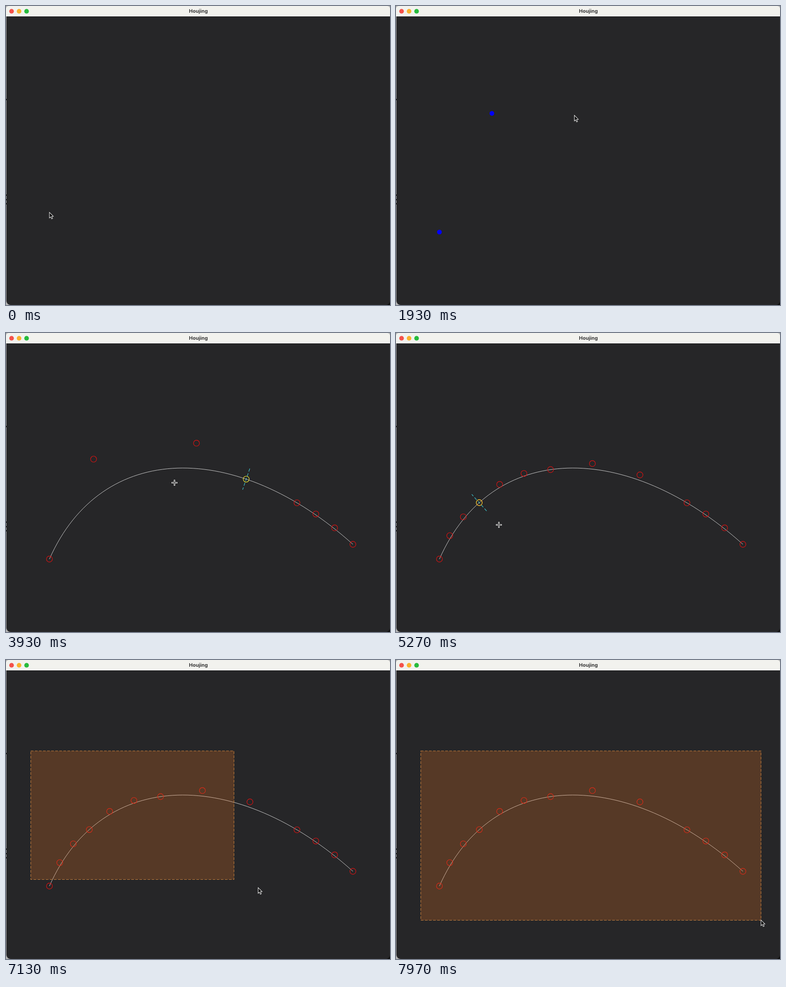
An HTML page with a canvas for the animation above (8 s loop, 849 by 660 pixels).

```html
<!DOCTYPE html>
<html lang="en">
<head>
<meta charset="utf-8">
<title>Houjing</title>
<style>
  html, body { margin: 0; width: 100%; height: 100%; overflow: hidden; background: #262628; }
  canvas { display: block; }
</style>
</head>
<body>
<canvas id="stage" width="849" height="660"></canvas>
<script>
const ctx = document.getElementById('stage').getContext('2d');
const LOOP = 8000;
const LAG = 60; // hover and selection trail the pointer

const control = [[96, 499], [212, 237], [511, 236.5], [767, 466.5]];
const dotTimes = [780, 1640, 2130];
const CURVE_AT = 2800;
const HOVER_FROM = 3100, HOVER_TO = 5800;
const DRAG_FROM = 6910;
const splits = [[3570, 0.842], [4330, 0.532], [5130, 0.44]];

// Eased pointer moves: start, end, x, y, sag
const home = [96, 455.5];
const moves = [
  [270, 300, 95.5, 454],
  [500, 690, 96, 498],
  [930, 1300, 148, 294],
  [1300, 1660, 212, 237],
  [1830, 2006, 511, 236.5, 5],
  [2270, 2630, 755, 448],
  [2670, 2790, 766, 466],
  [3100, 3560, 638, 385],
  [3800, 3962, 344, 325],
  [4450, 5000, 227, 423],
  [5600, 6030, 226, 420],
  [6200, 6600, 54.5, 201]
];
// Selection drag: time, x, y
const drag = [
  [6850, 54.5, 201], [6910, 110, 269], [6970, 364, 439], [7000, 440, 462],
  [7310, 718, 558], [7370, 754, 568], [7550, 804, 573], [7900, 807, 574]
];

const lerp = (a, b, k) => a + (b - a) * k;
const mix = (p, q, k) => [lerp(p[0], q[0], k), lerp(p[1], q[1], k)];
const ease = k => k * k * (3 - 2 * k);

function pointer(t) {
  const next = drag.findIndex(key => key[0] > t);
  if (next < 0) return drag[drag.length - 1].slice(1);
  if (next > 0) {
    const a = drag[next - 1], b = drag[next];
    return mix(a.slice(1), b.slice(1), (t - a[0]) / (b[0] - a[0]));
  }
  let pos = home;
  for (const [start, end, x, y, sag = 0] of moves) {
    if (t < start) break;
    const k = ease(Math.min(1, (t - start) / (end - start)));
    pos = mix(pos, [x, y], k);
    pos[1] += sag * Math.sin(Math.PI * k);
  }
  return pos;
}

// De Casteljau subdivision
function split([a, b, c, d], k) {
  const ab = mix(a, b, k), bc = mix(b, c, k), cd = mix(c, d, k);
  const l = mix(ab, bc, k), r = mix(bc, cd, k), m = mix(l, r, k);
  return { left: [a, ab, l, m], right: [m, r, cd, d], point: m, dir: [r[0] - l[0], r[1] - l[1]] };
}

function nearest(p) {
  let best = null, min = Infinity;
  for (let i = 0; i <= 600; i++) {
    const s = split(control, i / 600);
    const dist = Math.hypot(s.point[0] - p[0], s.point[1] - p[1]);
    if (dist < min) { min = dist; best = s; }
  }
  return best;
}

function handles(t) {
  let first = control, rest = [];
  for (const [at, k] of splits) {
    if (t < at) break;
    const s = split(first, k);
    rest = s.right.slice(1).concat(rest);
    first = s.left;
  }
  return first.concat(rest);
}

function circle([x, y], r, fill, stroke) {
  ctx.beginPath();
  ctx.arc(x, y, r, 0, Math.PI * 2);
  if (fill) { ctx.fillStyle = fill; ctx.fill(); }
  if (stroke) { ctx.strokeStyle = stroke; ctx.lineWidth = 1.15; ctx.stroke(); }
}

function line(a, b, color, width) {
  ctx.beginPath();
  ctx.moveTo(...a);
  ctx.lineTo(...b);
  ctx.strokeStyle = color;
  ctx.lineWidth = width;
  ctx.stroke();
}

function drawWindow() {
  ctx.fillStyle = '#b4b4b4';
  ctx.fillRect(0, 0, 849, 660);
  ctx.fillStyle = '#0c0c0c';
  ctx.fillRect(840, 650, 9, 10);
  for (const y of [205, 416, 426, 435]) ctx.fillRect(0, y, 1, 3);
  ctx.fillStyle = '#262628';
  ctx.beginPath();
  ctx.roundRect(1, 0, 848, 660, 9);
  ctx.fill();
  ctx.fillStyle = '#f2f2ee';
  ctx.beginPath();
  ctx.roundRect(0, 0, 849, 23, [6, 6, 0, 0]);
  ctx.fill();
  ctx.fillStyle = '#18181a';
  ctx.fillRect(1, 23, 848, 1);
  ['#f4524b', '#f9b32d', '#27bb3c'].forEach((color, i) => circle([12.3 + i * 16.6, 11.7], 5.1, color));
  ctx.fillStyle = '#383838';
  ctx.font = '700 11px Inter, sans-serif';
  ctx.textAlign = 'center';
  ctx.fillText('Houjing', 425.3, 15.3);
}

function drawCurve(t) {
  const [a, b, c, d] = control;
  ctx.beginPath();
  ctx.moveTo(...a);
  ctx.bezierCurveTo(...b, ...c, ...d);
  ctx.strokeStyle = '#d6d6d6';
  ctx.lineWidth = 0.95;
  ctx.stroke();
  for (const p of handles(t)) circle(p, 6.6, null, '#e01212');
}

function drawHover(t) {
  const { point: [x, y], dir: [dx, dy] } = nearest(pointer(t - LAG));
  const half = (dy < 0 ? -24.6 : 24.6) / Math.hypot(dx, dy);
  const nx = dy * half, ny = -dx * half;
  ctx.setLineDash([7, 4]);
  line([x + nx, y + ny], [x - nx, y - ny], '#3fd8e0', 1.1);
  ctx.setLineDash([]);
  circle([x, y], 6.6, null, '#f2ee35');
}

function drawSelection(t) {
  const [x, y] = pointer(t - LAG);
  const left = 54.8, top = 200.8;
  const w = Math.round(x) - left, h = Math.round(y) + 0.5 - top;
  ctx.fillStyle = 'rgba(226, 114, 32, 0.25)';
  ctx.fillRect(left, top, w, h);
  ctx.setLineDash([6, 3]);
  ctx.strokeStyle = '#c9823f';
  ctx.lineWidth = 1.1;
  ctx.strokeRect(left, top, w, h);
  ctx.setLineDash([]);
}

function drawArrow([x, y]) {
  const shape = [[0, 0], [0, 12.4], [2.8, 9.8], [4.9, 14.4], [7, 13.5], [5, 9], [8.7, 8.8]];
  ctx.beginPath();
  for (const [px, py] of shape) ctx.lineTo(x + px, y + py);
  ctx.closePath();
  ctx.fillStyle = '#050505';
  ctx.fill();
  ctx.strokeStyle = '#f4f4f4';
  ctx.lineWidth = 1.05;
  ctx.stroke();
}

function drawCross([px, py]) {
  const x = Math.floor(px) + 0.5, y = Math.floor(py) + 0.5;
  const plus = (r, width, color) => {
    line([x - r, y], [x + r, y], color, width);
    line([x, y - r], [x, y + r], color, width);
  };
  plus(6.5, 3, '#f4f4f4');
  plus(5.5, 1, '#101010');
}

function draw(t) {
  const hovering = t >= HOVER_FROM && t < HOVER_TO;
  drawWindow();
  if (t < CURVE_AT) {
    dotTimes.forEach((at, i) => { if (t >= at) circle(control[i], 5.2, '#0000ff'); });
  } else {
    drawCurve(t);
  }
  if (hovering) drawHover(t);
  if (t >= DRAG_FROM) drawSelection(t);
  (hovering ? drawCross : drawArrow)(pointer(t));
}

function tick() {
  draw(performance.now() % LOOP);
  requestAnimationFrame(tick);
}
tick();
</script>
</body>
</html>
```
